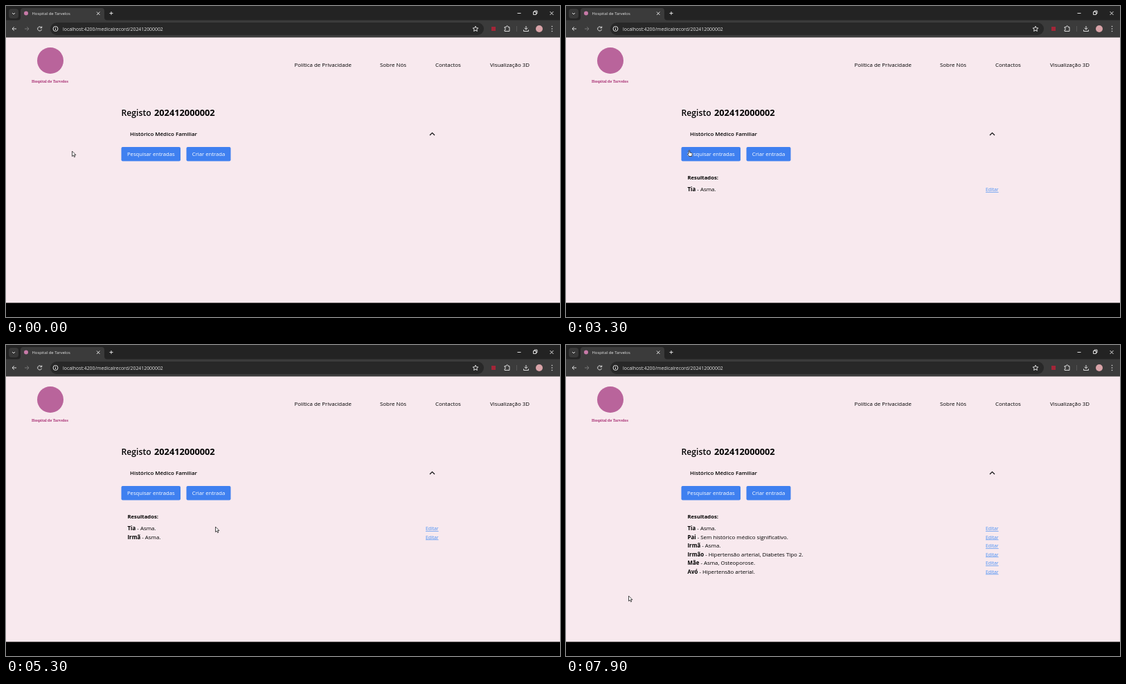
Recreate the animation shown at these times as an HTML page. Size 800x450 px, loop 8 s.

```html
<!DOCTYPE html>
<html lang="pt">
<head>
<meta charset="utf-8">
<title>Registo</title>
<style>
html, body { margin: 0; width: 100%; height: 100%; overflow: hidden; background: #000; }
svg { display: block; width: 800px; height: 450px; font: 7.9px "Open Sans", "Noto Sans", sans-serif; }
.semi { font-weight: 600; }
.bold { font-weight: 700; }
.line { fill: none; stroke: #dedede; stroke-width: 1; }
.link { font-size: 6.8px; fill: #4a90f5; text-decoration: underline; }
.hint { fill: #a5a3a9; }
</style>
</head>
<body>
<svg viewBox="0 0 800 450">
  <!-- browser -->
  <rect width="800" height="46" fill="#232323"/>
  <rect x="4" y="4" width="14" height="14" rx="4" fill="#383838"/>
  <path d="M17 20.500q4 0 4-4V7q0-4 4-4H138q4 0 4 4v9.500q0 4 4 4H800V45.500H0V20.500z" fill="#3b3b3b"/>
  <rect x="64" y="24" width="626" height="18" rx="9" fill="#282828"/>
  <circle cx="29" cy="10.500" r="3" fill="#c77aa8"/>
  <rect x="701" y="30" width="6" height="6" fill="#a32638"/>
  <circle cx="770" cy="33" r="5" fill="#d9a3a8"/>
  <g class="line">
    <path d="M9 10l2 2 2-2M131 8.500l4.500 4.500m0-4.500l-4.500 4.500M149.500 10.500h5M152 8v5"/>
    <path d="M738.500 10.500h5M761.500 8.500h4v4h-4zM763 8.300V7h4v4h-1.300M785.500 8l5 5m0-5l-5 5"/>
    <path d="M15 33H9m2.700-2.800L9 33l2.700 2.800"/>
    <path d="M27 33h6m-2.700-2.800L33 33l-2.700 2.800" stroke="#777"/>
    <path d="M51.300 31.500A3 3 0 1 0 51.500 34M51.700 29.500v2.300h-2.300"/>
    <circle cx="71.500" cy="33" r="3.500"/><path d="M71.500 32.500v2.500M71.500 30.800v.8"/>
    <path d="M678 29.200l1.100 2.500 2.800.3-2.100 1.800.6 2.700-2.400-1.400-2.400 1.400.6-2.700-2.100-1.800 2.800-.3z"/>
    <path d="M720 30.500h2.300q0-1.700 1.400-1.700t1.400 1.700H727v6h-7v-2q1.500 0 1.500-1.200T720 32z"/>
    <path d="M737.500 29v8" stroke="#555"/>
    <path d="M751 29v5m-2.300-2.200L751 34l2.300-2.200M747.500 34.500v2h7v-2"/>
  </g>
  <path d="M788.500 29.500v0m0 3.500v0m0 3.500v0" stroke="#dedede" stroke-width="1.600" stroke-linecap="round"/>
  <g fill="#e4e4e4">
    <text x="37.500" y="13" font-size="5.900">Hospital de Tarvelos</text>
    <text x="82" y="35.500" font-size="6.900">localhost:4200/medicalrecord/202412000002</text>
  </g>

  <!-- page -->
  <rect y="45.500" width="800" height="384" fill="#f8e9ee"/>
  <circle cx="64" cy="79" r="19" fill="#b9649b"/>
  <text x="63.500" y="111" text-anchor="middle" fill="#a5296f" style="font:700 5.100px 'Noto Serif',serif">Hospital de Tarvelos</text>
  <text x="416.500" y="88">Política de Privacidade</text>
  <text x="540" y="88">Sobre Nós</text>
  <text x="620" y="88">Contactos</text>
  <text x="699" y="88">Visualização 3D</text>
  <text x="166.500" y="158.500" class="semi" font-size="12.200">Registo</text>
  <text x="214" y="158.500" class="bold" font-size="12.800">202412000002</text>
  <text x="179" y="188" class="semi">Histórico Médico Familiar</text>
  <path d="M612 187l3.500-3.500 3.500 3.500" fill="none" stroke="#111" stroke-width="1.200"/>
  <rect x="166.500" y="204" width="85.500" height="20.500" rx="2" fill="#3f80f0"/>
  <rect x="260.500" y="204" width="64" height="20.500" rx="2" fill="#3f80f0"/>
  <g fill="#fff" text-anchor="middle" font-size="7.700">
    <text x="209.300" y="217.300">Pesquisar entradas</text>
    <text x="292.500" y="217.300">Criar entrada</text>
  </g>
  <g id="results"></g>

  <!-- dialog -->
  <g id="dialog">
    <rect y="45.500" width="800" height="384" fill="#111827" opacity=".46"/>
    <rect x="267" y="159" width="266.500" height="158" rx="4" fill="#fff"/>
    <text x="279.500" y="182" class="semi" font-size="8.600">Pesquisar entradas</text>
    <g id="fields"></g>
    <rect x="430" y="283.500" width="48.500" height="20.500" rx="2" fill="#d0d3d8"/>
    <rect x="482.500" y="283.500" width="38.500" height="20.500" rx="2" fill="#2fdb60"/>
    <g text-anchor="middle">
      <text x="454.200" y="297" fill="#4b5059">Cancelar</text>
      <text x="501.700" y="297" fill="#fff">Salvar</text>
    </g>
  </g>

  <g id="cursor" stroke="#222" stroke-width=".8" stroke-linejoin="round">
    <path id="arrow" d="M0 0v7.600l1.800-1.600 1.300 2.700 1.200-.6-1.200-2.600h2.300z" fill="#fff"/>
    <path id="hand" d="M-.8 5V.8q.8-1.200 1.600 0V3.500l2.800.8q.8.400.6 1.400L3.600 9H-.2L-2.600 5.700q.5-1 1.800-.1z" fill="#fff"/>
    <path id="beam" d="M-1.500-4h3M0-4v8M-1.500 4h3" fill="none"/>
  </g>
</svg>
<script>
const LOOP = 8000, STEP = 100;
const $ = id => document.getElementById(id);
const show = (id, on) => $(id).style.display = on ? '' : 'none';

// [time, x, y, pointer shape]
const path = [
  [0, 95.5, 210, 'arrow'], [400, 178, 211, 'hand'], [600, 178, 211, 'arrow'],
  [900, 254, 264, 'arrow'], [1100, 282, 199, 'arrow'], [1400, 282, 199, 'arrow'],
  [1700, 297.5, 217, 'beam'], [2500, 297.5, 217, 'arrow'], [2900, 247, 218, 'hand'],
  [3000, 247, 218, 'hand'], [3300, 178, 208.5, 'hand'], [3600, 178, 208.5, 'arrow'],
  [4100, 282, 244, 'arrow'], [4200, 282, 244, 'arrow'], [4500, 303, 264, 'beam'],
  [5200, 302.5, 263, 'arrow'], [5300, 302.5, 263, 'arrow'], [5900, 179.500, 217, 'hand'],
  [6200, 179.5, 217, 'arrow'], [6500, 179.5, 217, 'arrow'], [6900, 501, 293, 'hand'],
  [7100, 501, 293, 'arrow'], [7800, 90.5, 363, 'arrow'], [LOOP, 90.5, 363, 'arrow']
];
const dialogs = [[600, 2500], [3600, 5200], [6200, 7100]];
const fields = [
  { label: 'Familiar', y: 200.5, check: [1300, 2500], focus: [1800, 2500],
    typing: [[1900, 'T'], [2000, 'Ti'], [2200, 'Tia']] },
  { label: 'Detalhes', y: 245, check: [4200, 5200], focus: [4600, 5200],
    typing: [[4700, 's'], [4800, 'sm'], [4900, 'sma'], [5000, 'sma.']] }
];
const history = {
  Tia: 'Asma.', Pai: 'Sem histórico médico significativo.', Irmã: 'Asma.',
  Irmão: 'Hipertensão arterial, Diabetes Tipo 2.', Mãe: 'Asma, Osteoporose.', Avó: 'Hipertensão arterial.'
};
const searches = [[2500, ['Tia']], [5200, ['Tia', 'Irmã']], [7100, Object.keys(history)]];

const within = ([from, to], t) => t >= from && t < to;
const latest = (list, t) => list.filter(([at]) => at <= t).pop()?.[1];

function resultsMarkup(names) {
  if (!names) return '';
  const rows = names.map((name, i) => {
    const y = 268 + i * 12.5;
    return `<text x="175.500" y="${y}"><tspan class="bold">${name}</tspan> - ${history[name]}</text>
      <text x="606" y="${y}" class="link">Editar</text>`;
  });
  return '<text x="175.500" y="251" class="bold" font-size="7.700">Resultados:</text>' + rows.join('');
}

function fieldMarkup({ label, y, check, focus, typing }, t) {
  const checked = within(check, t), focused = within(focus, t);
  const text = checked && latest(typing, t) || '';
  const box = checked
    ? `<rect x="279.300" y="${y - 3.2}" width="6.400" height="6.400" rx="1" fill="#2f76e8"/>
       <path d="M280.700 ${y}l1.300 1.400 2.300-2.700" fill="none" stroke="#fff"/>`
    : `<rect x="279.800" y="${y - 2.7}" width="5.400" height="5.400" rx="1" fill="#fff" stroke="#777" stroke-width=".8"/>`;
  const stroke = focused ? 'stroke="#111" stroke-width="1.400"' : 'stroke="#e9e7ec" stroke-width=".8"';
  const content = text ? `<text x="286" y="${y + 22.2}" class="value">${text}</text>`
    : focused ? '' : `<text x="286" y="${y + 22.2}" class="hint" font-size="7.700">Insira o ${label}</text>`;
  return `${box}<text x="290" y="${y + 3}">${label}</text>
    <rect x="279.500" y="${y + 8.7}" width="241.300" height="21" rx="2.500" fill="${checked ? '#fff' : '#fdfafd'}" ${stroke}/>
    ${content}${focused ? `<path class="caret" d="M286.500 ${y + 14.5}v9.500" stroke="#111" stroke-width=".8"/>` : ''}`;
}

function drawCursor(t) {
  const i = path.findLastIndex(([at]) => at <= t);
  const [t0, x0, y0, shape] = path[i], [t1, x1, y1] = path[i + 1];
  const p = (t - t0) / (t1 - t0), k = p * p * (3 - 2 * p);
  $('cursor').setAttribute('transform', `translate(${x0 + (x1 - x0) * k} ${y0 + (y1 - y0) * k})`);
  for (const id of ['arrow', 'hand', 'beam']) show(id, id === shape);
}

function draw(t) {
  $('results').innerHTML = resultsMarkup(latest(searches, t));
  const open = dialogs.some(span => within(span, t));
  show('dialog', open);
  if (open) {
    $('fields').innerHTML = fields.map(field => fieldMarkup(field, t)).join('');
    const value = document.querySelector('.value'), caret = document.querySelector('.caret');
    if (value && caret) caret.setAttribute('transform', `translate(${value.getComputedTextLength()} 0)`);
  }
  drawCursor(t);
}

let shown = -1;
function tick() {
  const t = Math.floor(performance.now() % LOOP / STEP) * STEP;
  if (t !== shown) draw(shown = t);
  requestAnimationFrame(tick);
}
tick();
</script>
</body>
</html>
```
